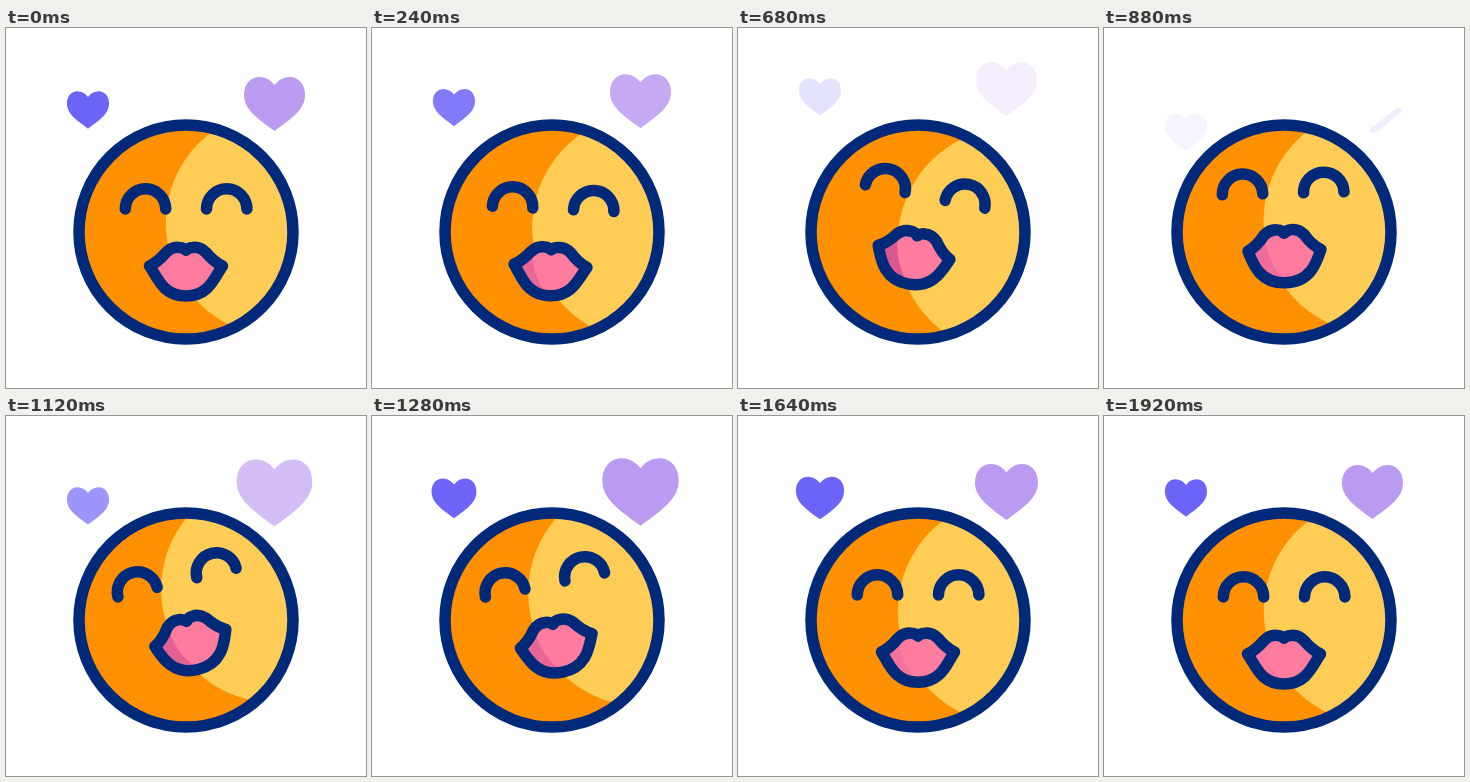
Write an HTML page that moves like this. It is 360 by 360 pixels and loops after 2.04 s.

```html
<!DOCTYPE html>
<html lang="en">
<head>
<meta charset="utf-8">
<title>Kissing face</title>
<style>
html, body { margin: 0; width: 100%; height: 100%; overflow: hidden; background: #fff; }
svg { display: block; width: 100vw; height: 100vh; }
.line { stroke: #00297a; stroke-width: 11.5; stroke-linecap: round; stroke-linejoin: round; fill: none; }
</style>
</head>
<body>
<svg viewBox="0 0 360 360">
  <defs>
    <path id="heart" d="M0 27C-18 14-30.5 5-30.5-9C-30.5-20-24-27-15-27C-9-27-4-24 0-19C4-24 9-27 15-27C24-27 30.5-20 30.5-9C30.5 5 18 14 0 27Z"/>
    <clipPath id="disc"><circle cx="180" cy="204" r="107"/></clipPath>
    <clipPath id="lips"><path class="mouth"/></clipPath>
  </defs>
  <use id="left" href="#heart" fill="#6c63f8"/>
  <use id="right" href="#heart" fill="#bb9af1"/>
  <path id="glint" d="M269 102Q277 98 282 92L294 83" fill="none" stroke="#f1ecfc" stroke-width="6" stroke-linecap="round"/>
  <circle cx="180" cy="204" r="107" fill="#ff9000"/>
  <g clip-path="url(#disc)">
    <circle id="light" cx="273.3" cy="195" r="113.5" fill="#ffcc55"/>
  </g>
  <circle class="line" cx="180" cy="204" r="107"/>
  <g id="features">
    <path class="line" d="M119.3 181a20.2 20.2 0 0 1 40.4 0M200.5 181a20.2 20.2 0 0 1 40.4 0"/>
    <path class="mouth" fill="#ff7c9f"/>
    <path id="shade" clip-path="url(#lips)" d="M135 210H160Q159 250 183 272H135Z" fill="#c8488a"/>
    <path class="mouth line"/>
  </g>
</svg>
<script>
const LOOP = 2040, STEP = 40;
const $ = id => document.getElementById(id);
const mouths = document.querySelectorAll('.mouth');
const smooth = u => u * u * (3 - 2 * u);
const linear = u => u;

// Value at time t along [time, value] keys
function track(t, keys, ease = smooth) {
  const i = keys.findIndex(k => k[0] > t);
  if (i === 0) return keys[0][1];
  if (i < 0) return keys[keys.length - 1][1];
  const [t0, a] = keys[i - 1], [t1, b] = keys[i];
  return a + (b - a) * ease((t - t0) / (t1 - t0));
}

// m runs from pursed (0) to open (1)
function mouthPath(m) {
  const top = 219.5 - 2 * m, dip = 222 - m, low = 268 + 2.5 * m;
  const inner = 152 - 4 * m, outer = 157 - 3 * m;
  return `M143.5 238Q152 234 160 ${top + 5}Q166 ${top - 1} 173 ${top}Q177 ${top} 180 ${dip}` +
    `Q183 ${top} 187 ${top}Q194 ${top - 1} 200 ${top + 5}Q208 234 216.5 238` +
    `C${360 - inner} 250 ${360 - outer} ${low} 180 ${low}C${outer} ${low} ${inner} 250 143.5 238Z`;
}

function placeHeart(id, x, y, scale, opacity) {
  $(id).setAttribute('transform', `translate(${x} ${y}) scale(${scale})`);
  $(id).setAttribute('opacity', opacity);
}

function draw(t) {
  const angle = track(t, [[120, 0], [560, 14], [1160, -14], [1600, 0]]);
  const lift = track(t, [[200, 0], [840, 15.7], [1080, 15.7], [1800, 0]]);
  const turn = `rotate(${angle} 180 204)`;
  $('light').setAttribute('transform', turn);
  $('features').setAttribute('transform', `${turn} translate(0 ${-lift})`);
  const d = mouthPath(lift / 15.7);
  mouths.forEach(p => p.setAttribute('d', d));
  $('shade').setAttribute('opacity', track(t,
    [[80, .07], [240, .4], [520, .95], [880, .3], [1120, .5], [1440, .35], [1800, .07]], linear));

  const fade = track(t, [[140, 0], [800, 1]], linear);
  const rise = track(t, [[800, 0], [1320, 1]]);
  const leftGrow = track(t, [[1200, 1], [1450, 1.28], [1840, 1]]);
  placeHeart('left', 82, t < 800 ? 82 - 16 * fade : 82 + 24 * (1 - rise),
    .69 * leftGrow, t < 800 ? 1 - fade : rise);

  const show = track(t, [[880, 0], [1280, 1]]);
  const rightGrow = track(t, [[840, 1], [1180, 1.26], [1220, 1.26], [1760, 1]]);
  placeHeart('right', 268.5, t < 800 ? 76 - 18 * fade : 76 + 2.5 * (1 - show),
    rightGrow, t < 800 ? 1 - fade : show);
  $('glint').setAttribute('opacity', t >= 880 && t < 920 ? 1 : 0);
}

const start = performance.now();
function tick() {
  const t = (performance.now() - start) % LOOP;
  draw(Math.floor(t / STEP) * STEP);
  requestAnimationFrame(tick);
}
tick();
</script>
</body>
</html>
```
